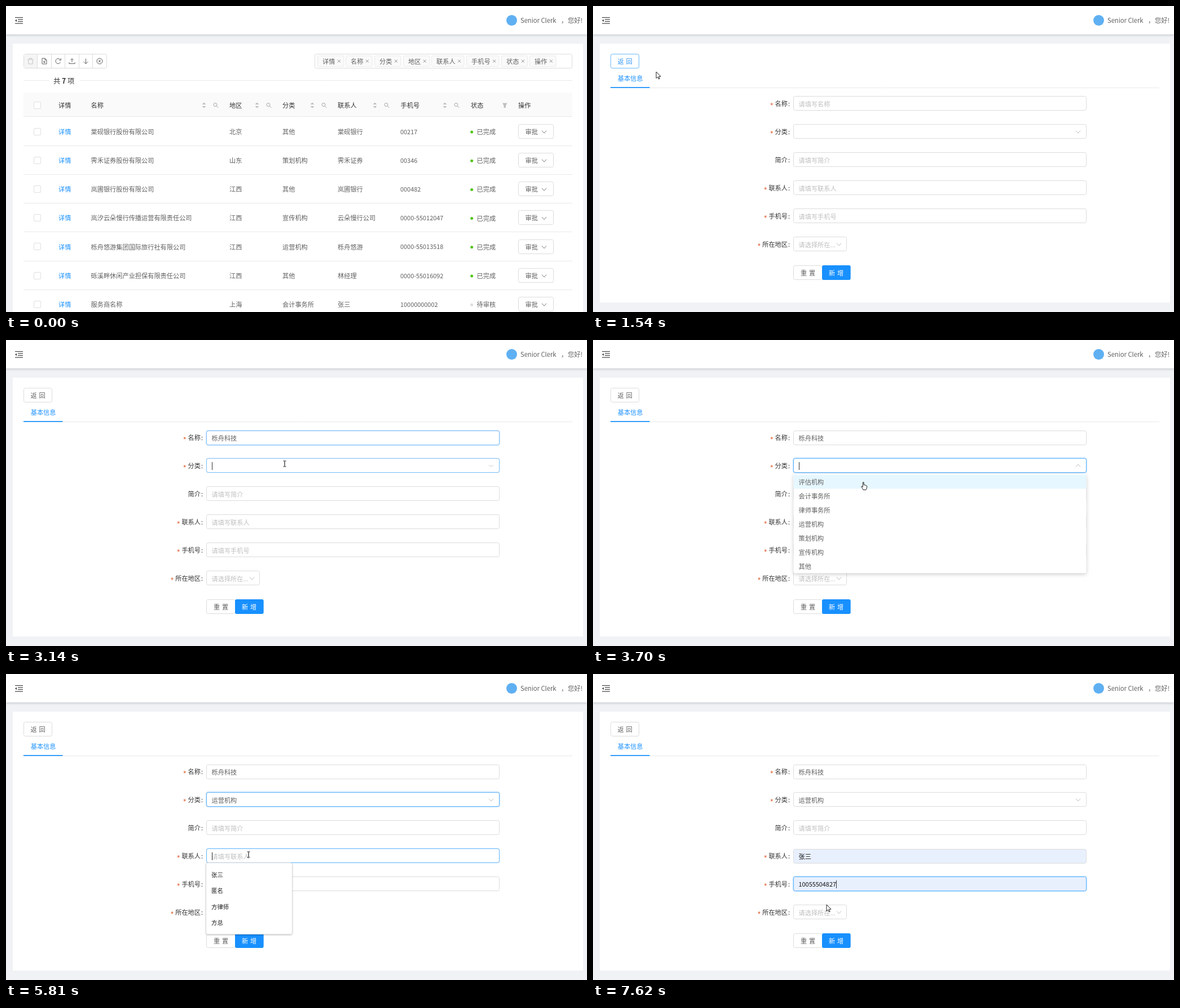
Write an HTML page with a canvas that moves like this. It is 1030x544 px and loops after 8 s.

```html
<!DOCTYPE html>
<html lang="zh-CN">
<head>
<meta charset="utf-8">
<title>服务商管理</title>
<style>
html, body { margin: 0; width: 100%; height: 100%; overflow: hidden; background: #f0f2f5; }
canvas { display: block; width: 1030px; height: 544px; }
</style>
</head>
<body>
<canvas id="stage" width="1030" height="544"></canvas>
<script>
const ctx = document.getElementById('stage').getContext('2d');
const LOOP = 8000, FONT = '"Noto Sans CJK SC", "Noto Sans CJK", sans-serif';
const BLUE = '#1890ff', HOVER = '#58b3ff', BODY = '#606060', DARK = '#333';
const HINT = '#bfbfbf', BORDER = '#dcdcdc', LINE = '#e9e9e9';

const clamp = v => Math.max(0, Math.min(1, v));
const ramp = (t, start, length = 300) => clamp((t - start) / length);
const smooth = p => p * p * (3 - 2 * p);
const within = (t, a, b) => t >= a && t < b;
const crisp = v => Math.floor(v) + .5;

function text(str, x, cy, color = BODY, size = 11.2, weight = 350) {
  ctx.font = `${weight} ${size}px ${FONT}`;
  ctx.fillStyle = color;
  ctx.fillText(str, x, cy + size * 0.38);
  return x + ctx.measureText(str).width;
}
const spaced = (str, x, cy, color) => [...str].forEach((c, i) => text(c, x + i * 15, cy, color));

function fill(color, x, y, w, h) {
  ctx.fillStyle = color;
  ctx.fillRect(x, y, w, h);
}
function box(x, y, w, h, { bg, border, r = 3, width = 1 } = {}) {
  ctx.beginPath();
  ctx.roundRect(x, y, w, h, r);
  if (bg) { ctx.fillStyle = bg; ctx.fill(); }
  if (border) { ctx.strokeStyle = border; ctx.lineWidth = width; ctx.stroke(); }
}
function dot(x, y, r, color) {
  ctx.beginPath();
  ctx.arc(x, y, r, 0, 7);
  ctx.fillStyle = color;
  ctx.fill();
}
function ring(x, y, r, color, from = 0, to = 7) {
  ctx.beginPath();
  ctx.arc(x, y, r, from, to);
  ctx.strokeStyle = color;
  ctx.lineWidth = 1;
  ctx.stroke();
}
function path(pts, stroke, width = 1, bg) {
  ctx.beginPath();
  for (let i = 0; i < pts.length; i += 2) ctx.lineTo(pts[i], pts[i + 1]);
  if (bg) { ctx.closePath(); ctx.fillStyle = bg; ctx.fill(); }
  if (stroke) { ctx.strokeStyle = stroke; ctx.lineWidth = width; ctx.stroke(); }
}
function at(x, y, draw) {
  ctx.save();
  ctx.translate(x, y);
  draw();
  ctx.restore();
}
function shadowed(color, blur, dy, draw) {
  ctx.save();
  ctx.shadowColor = color;
  ctx.shadowBlur = blur;
  ctx.shadowOffsetY = dy;
  draw();
  ctx.restore();
}
function faded(alpha, draw) {
  ctx.save();
  ctx.globalAlpha *= alpha;
  draw();
  ctx.restore();
}
const chevron = (x, y, color, flip = 0) => at(x, y, () => {
  ctx.scale(1, 1 - 2 * flip);
  path([-4, -2, 0, 2.5, 4, -2], color);
});

function header() {
  shadowed('rgba(0,21,41,.2)', 4, 1, () => fill('#fff', 0, 0, 1030, 50.5));
  for (const [x, y] of [[16, 20.5], [21, 24], [21, 27.5], [16, 31]]) path([x, y, 30, y], '#444', 1.2);
  path([16, 25.8, 19, 23.4, 19, 28.2], null, 0, '#444');
  dot(896.5, 25.5, 9.5, '#5fb0f2');
  text('Senior Clerk', 912, 25.5);
  text('，', 984, 25.5);
  text('您好!', 996, 25.5);
}

// ---- list page ----
const ICONS = [
  c => { path([-5, -3, 5, -3], c); path([-2, -3, -2, -5, 2, -5, 2, -3], c); path([-4, -3, -3.5, 5, 3.5, 5, 4, -3], c); },
  c => { path([1, -5, -4, -5, -4, 5, 4, 5, 4, -2, 1, -5, 1, -2, 4, -2], c); path([-2, 1.5, 2, 1.5], c); path([0, -.5, 0, 3.5], c); },
  c => { ring(0, 0, 4.5, c, .5, 5.6); path([4.8, -5, 4.8, -1.6, 1.6, -2], c); },
  c => { path([-5, 2, -5, 4.5, 5, 4.5, 5, 2], c); path([0, 2, 0, -4], c); path([-2.5, -2, 0, -4.5, 2.5, -2], c); },
  c => { path([0, -4.5, 0, 4.5], c); path([-4, .8, 0, 4.8, 4, .8], c); },
  c => { ring(0, 0, 5, c); path([-2, -2, 2, 2], c); path([-2, 2, 2, -2], c); }
];
const TAGS = [['详情', 561], ['名称', 611], ['分类', 662], ['地区', 713], ['联系人', 763], ['手机号', 825], ['状态', 887], ['操作', 937]];
const COLUMNS = [['详情', 93], ['名称', 150.5, 351], ['地区', 396, 445], ['分类', 490, 543],
  ['联系人', 588, 654], ['手机号', 699.5, 778], ['状态', 824], ['操作', 908]];
const ROWS = [
  ['棠砚银行股份有限公司', '北京', '其他', '棠砚银行', '00217'],
  ['霁禾证券股份有限公司', '山东', '策划机构', '霁禾证券', '00346'],
  ['岚圃银行股份有限公司', '江西', '其他', '岚圃银行', '000482'],
  ['岚汐云朵慢行传播运营有限责任公司', '江西', '宣传机构', '云朵慢行公司', '0000-55012047'],
  ['栎舟悠游集团国际旅行社有限公司', '江西', '运营机构', '栎舟悠游', '0000-55013518'],
  ['砾溪畔休闲产业担保有限责任公司', '江西', '其他', '林经理', '0000-55016092'],
  ['服务商名称', '上海', '会计事务所', '张三', '10000000002']
];
const checkbox = cy => box(49.5, crisp(cy - 6), 12, 12, { bg: '#fff', border: '#e0e0e0', r: 1.5 });

function toolbar(t) {
  box(31.5, 85.5, 147, 25, { bg: '#fff', border: BORDER });
  fill('#f5f5f5', 32, 86, 23, 24);
  ICONS.forEach((icon, i) => {
    const x = crisp(31 + i * 24.5);
    if (i) path([x, 85.5, x, 110.5], BORDER);
    at(43.5 + i * 24.5, 98, () => icon(i ? BODY : '#c4c4c4'));
  });
  faded(ramp(t, 880, 200), () => {
    box(55.5, 85.5, 25, 25, { bg: '#fff', border: HOVER, r: 0 });
    at(68, 98, () => ICONS[1](HOVER));
  });
}
function listPage(t) {
  fill('#fff', 12, 67, 1011, 477);
  toolbar(t);
  box(547.5, 85.5, 456, 25, { bg: '#fff', border: BORDER });
  for (const [label, x] of TAGS) {
    const cross = x + label.length * 11.2 + 7;
    box(x - 8.5, 88.5, crisp(cross - x + 17), 19, { bg: '#fafafa', border: LINE, r: 2 });
    text(label, x, 98.5);
    at(cross, 98, () => { path([-2.5, -2.5, 2.5, 2.5], '#8c8c8c'); path([-2.5, 2.5, 2.5, -2.5], '#8c8c8c'); });
  }
  path([31, 132.5, 76, 132.5], LINE);
  path([131, 132.5, 1004, 132.5], LINE);
  let x = text('共 ', 84, 133, DARK, 12.3);
  x = text('7', x, 133, DARK, 12.3, 700);
  text(' 项', x, 133, DARK, 12.3);

  fill('#fafafa', 31, 154, 973, 43);
  checkbox(176);
  for (const [label, left, sort] of COLUMNS) {
    text(label, left, 176.5, DARK);
    if (!sort) continue;
    path([sort - 3.5, 175, sort, 171.5, sort + 3.5, 175], null, 0, HINT);
    path([sort - 3.5, 178, sort, 181.5, sort + 3.5, 178], null, 0, HINT);
    ring(sort + 20, 175.5, 3, '#a6a6a6');
    path([sort + 22.2, 177.7, sort + 25.5, 181], '#a6a6a6');
  }
  path([880, 172.5, 888.5, 172.5, 886, 177, 886, 181, 882.5, 181, 882.5, 177], null, 0, HINT);
  path([31, 196.5, 1004, 196.5], LINE);

  ROWS.forEach(([name, area, kind, contact, phone], i) => {
    const y = 223 + i * 51.2, done = i < 6, line = crisp(y + 25.3);
    checkbox(y);
    text('详情', 93, y + .5, BLUE);
    text(name, 150.5, y + .5);
    text(area, 396, y + .5);
    text(kind, 490, y + .5);
    text(contact, 588, y + .5);
    text(phone, 699, y + .5, BODY, 10.9);
    dot(825.7, y + 1, 2.5, done ? '#52c41a' : BORDER);
    text(done ? '已完成' : '待审核', 834.5, y + .8);
    box(908.5, crisp(y - 12.7), 62, 25, { bg: '#fff', border: BORDER });
    text('审批', 920.5, y + .5);
    chevron(954, y + .5, '#777');
    path([31, line, 1004, line], LINE);
  });
}

// ---- form page ----
const COMPANY = '栎舟科技', PERSON = '张三', PHONE = '10055504827';
// on: border turns blue, focus: glow starts, blur: both fade
const FIELDS = [
  { label: '名称', need: 1, hint: '请填写名称', on: 1900, focus: 2000, blur: 3060, value: COMPANY, set: 2640 },
  { label: '分类', need: 1, hint: '', on: 2920, focus: 3080, blur: 5800, value: '运营机构', set: 4800, select: 1 },
  { label: '简介', hint: '请填写简介', on: 9e3, focus: 9e3, blur: 9e3, set: 9e3 },
  { label: '联系人', need: 1, hint: '请填写联系人', on: 4850, focus: 5810, blur: 6850, value: PERSON, set: 6330, auto: 1 },
  { label: '手机号', need: 1, hint: '请填写手机号', on: 6720, focus: 6850, blur: 9e3, value: PHONE, set: 7290, auto: 1 }
];
const OPTIONS = ['评估机构', '会计事务所', '律师事务所', '运营机构', '策划机构', '宣传机构', '其他'];
const POPUPS = [
  { y: 186, from: 2080, to: 2460, pick: 9e3, items: ['服务商名称', '测试服务商', '测试名称', '评估机构', '律师事务所', '会计事务所'] },
  { y: 336, from: 5800, to: 6560, pick: 6330, items: [PERSON, '匿名', '方律师', '方总'] },
  { y: 386, from: 6930, to: 7540, pick: 7290, items: [PHONE, '10000000002', '10055501936', '10055507250', '10055503314'] }
];

function label(str, need, cy) {
  const x = 345 - str.length * 11.2;
  text(str, x, cy, DARK);
  text(':', 346, cy, DARK);
  if (need) text('*', x - 9, cy + 3.6, '#e2693f', 14, 400);
}
function field(f, i, t) {
  const cy = 173.5 + i * 50, filled = t >= f.set;
  const top = cy - 13 + (filled && !f.select && i < 4 ? 1 : 0);
  const shape = opts => box(355.5, top, 519, 25, opts);
  label(f.label, f.need, cy + .7);
  const fade = 1 - ramp(t, f.blur), glow = ramp(t, f.focus) * fade;
  if (glow) box(354.5, top - 1, 521, 27, { border: `rgba(24,144,255,${.22 * glow})`, r: 4, width: 1.5 });
  shape({ bg: filled && f.auto ? '#e8f0fe' : '#fff', border: BORDER });
  faded(ramp(t, f.on) * fade, () => shape({ border: HOVER }));
  if (filled) text(f.value, 364.5, cy + .8, f.auto ? '#111' : BODY, i === 4 ? 10.9 : 11.2);
  else text(f.hint, 364.5, cy + .8, HINT);
  if (f.select) chevron(860, cy, HINT, ramp(t, 3090, 200) - ramp(t, 4800, 200));
  if (within(t, f.focus, f.blur) && !(f.select && filled)) {
    const preview = i === 3 && t < 6560;
    const x = filled && !preview ? 365 + ctx.measureText(f.value).width : 365;
    fill('#333', Math.floor(x), cy - 6.5, 1, 14);
  }
}
function dropdown(t, pointer) {
  const open = smooth(ramp(t, 3180, 200)), shown = open * (1 - ramp(t, 4800, 160));
  if (!shown) return;
  faded(shown, () => at(0, 238, () => {
    ctx.scale(1, .8 + .2 * shown);
    shadowed('rgba(0,0,0,.2)', 7, 2, () => box(355.5, 0, 519, 176.5, { bg: '#fff' }));
    const hovered = Math.floor((pointer.y - 239.5) / 25);
    OPTIONS.forEach((name, i) => {
      if (i === hovered) fill('#e6f7ff', 355.5, 1.5 + i * 25, 519, 25);
      text(name, 364.5, 15 + i * 25);
    });
  }));
}
function popup(p, t) {
  if (!within(t, p.from, p.to)) return;
  const h = 13 + p.items.length * 28.5;
  shadowed('rgba(0,0,0,.25)', 3, 1, () => box(354.5, p.y, 153, h, { bg: '#fff' }));
  box(354.5, p.y - .5, 153, h, { border: '#d4d4d4', width: .8 });
  if (t >= p.pick) fill('#e8e9eb', 355, p.y + 6, 152, 28.5);
  p.items.forEach((item, i) => text(item, 364, p.y + 20.7 + i * 28.5, '#1a1a1a', 10.4));
}
function formPage(t, pointer) {
  fill('#fff', 12, 67, 1011, 460);
  const back = (border, color) => {
    box(31.5, 85.5, 50, 25, { bg: '#fff', border });
    spaced('返回', 43.5, 98.7, color);
  };
  back(BORDER, BODY);
  faded(1 - ramp(t, 1500), () => back(HOVER, BLUE));
  text('基本信息', 43.7, 129, BLUE);
  path([31, 145.5, 1004, 145.5], LINE);
  fill(BLUE, 31, 144, 69.5, 1.7);

  FIELDS.forEach((f, i) => field(f, i, t));
  label('所在地区', 1, 424);
  box(355.5, 410.5, 94, 25, { bg: '#fff', border: BORDER });
  text('请选择所在...', 364.5, 424.3, HINT);
  chevron(436, 423.5, HINT);
  box(355.5, 461.5, 51, 25, { bg: '#fff', border: BORDER });
  spaced('重置', 368, 474.5, BODY);
  box(406, 461, 50.7, 26, { bg: BLUE });
  spaced('新增', 418, 474.5, '#fff');
  dropdown(t, pointer);
  POPUPS.forEach(p => popup(p, t));
}

// ---- pointer ----
const ROUTE = [[210, 872, 518], [900, 68, 97], [1300, 68, 97], [1540, 112, 117], [1960, 480, 175], [2700, 480, 175],
  [3020, 494, 220], [3470, 494, 220], [4200, 431, 359], [4320, 431, 359], [4560, 429, 321], [5810, 430, 321], [6200, 430, 321],
  [6400, 409, 347], [6560, 409, 347], [6800, 414, 372], [7210, 414, 372], [7400, 414, 410], [LOOP, 414, 410]];
const CLICKS = [1060, 1990, 3010, 4700, 5840, 6420, 6850, 7430];
const SHAPES = [[210, 'arrow'], [880, 'hand'], [1480, 'arrow'], [1820, 'beam'], [3540, 'hand'],
  [4850, 'beam'], [6270, 'arrow'], [6700, 'beam'], [7270, 'arrow']];

function pointerAt(t) {
  const i = Math.max(1, ROUTE.findIndex(k => t < k[0]));
  const [t0, x0, y0] = ROUTE[i - 1], [t1, x1, y1] = ROUTE[i];
  const p = smooth(ramp(t, t0, t1 - t0));
  return { x: x0 + (x1 - x0) * p, y: y0 + (y1 - y0) * p };
}
const CURSORS = {
  arrow() { path([0, 0, 0, 11.5, 2.7, 9, 4.5, 13, 6.2, 12.2, 4.5, 8.4, 8, 8.2, 0, 0], '#222', 1, '#fff'); },
  beam() {
    path([0, -4.5, 0, 4.5], '#222', 1.2);
    path([-2.5, -5, 2.5, -5], '#222');
    path([-2.5, 5, 2.5, 5], '#222');
  },
  hand() {
    path([-.5, 0, 1, 0, 1.3, 5, 3, 4.8, 4.5, 5.5, 6, 6, 6.7, 7.5, 6, 11, 4.8, 13.5, 0, 13.5,
      -1.5, 10.5, -3.5, 8, -2.5, 7, -.8, 8.4, -.5, 0], '#222', 1, '#fff');
  }
};
function drawPointer(t, { x, y }) {
  if (t < 210) return;
  if (CLICKS.some(c => within(t, c, c + 105))) dot(x, y, 9.5, 'rgba(243,236,20,.75)');
  const shape = SHAPES.filter(s => s[0] <= t).pop()[1];
  at(x, y, CURSORS[shape]);
}

function frame(now) {
  const t = now % LOOP, pointer = pointerAt(t);
  fill('#f0f2f5', 0, 0, 1030, 544);
  header();
  if (t < 1200) listPage(t);
  else formPage(t, pointer);
  drawPointer(t, pointer);
}
const start = performance.now();
function tick() {
  frame(performance.now() - start);
  requestAnimationFrame(tick);
}
tick();
</script>
</body>
</html>
```
